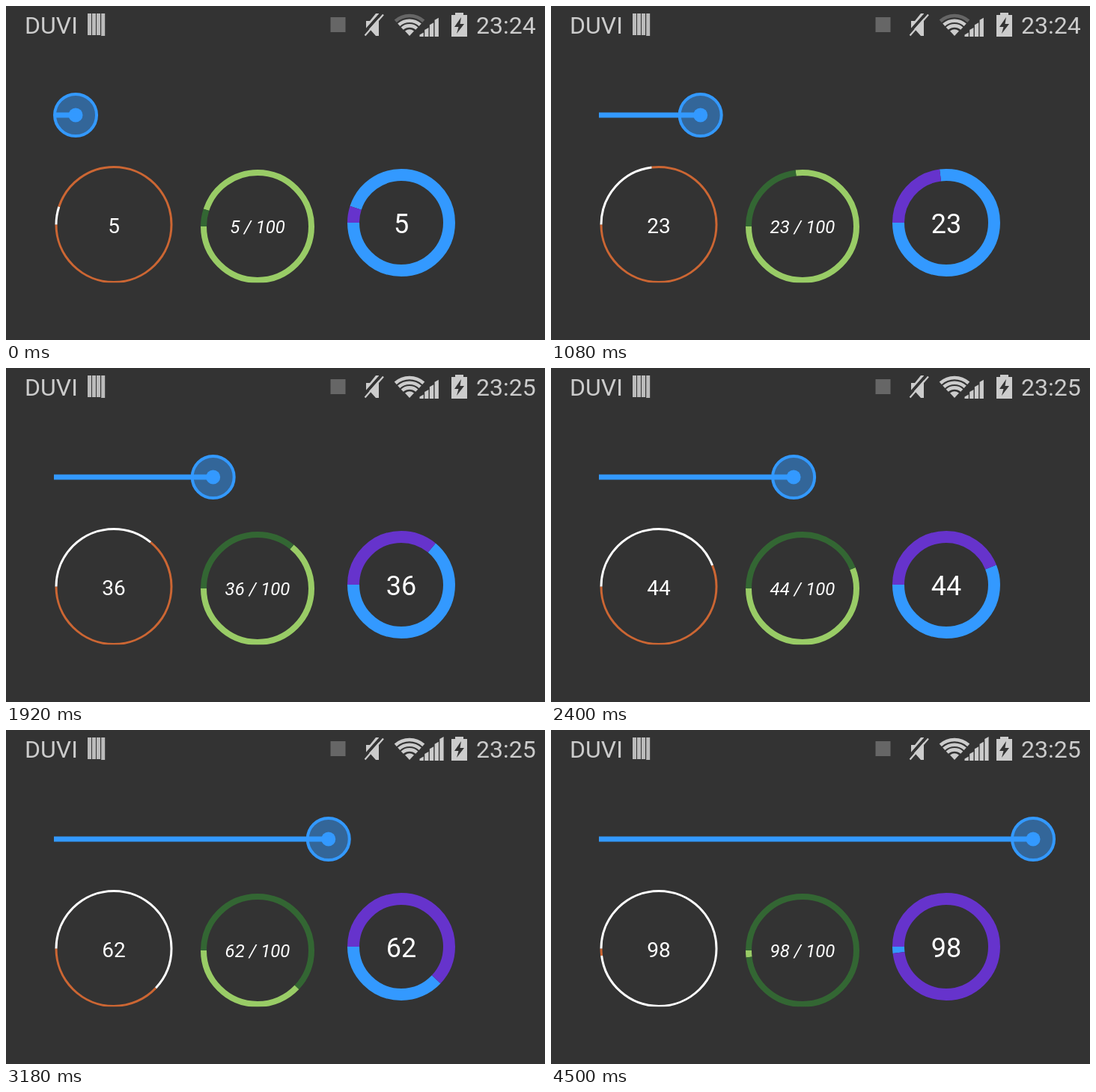
Animation, 720 px wide and 447 px high, one loop 4.62 s. Source, as an HTML page:

```html
<!DOCTYPE html>
<html lang="en">
<head>
<meta charset="utf-8">
<title>Circular progress</title>
<style>
  html, body { margin: 0; width: 100%; height: 100%; overflow: hidden; background: #333; }
  svg { display: block; width: 720px; height: 447px; }
  text { font-family: Roboto, sans-serif; }
  .status text { font-size: 32px; }
  .rings text { fill: #fff; text-anchor: middle; }
</style>
</head>
<body>
<svg viewBox="0 0 720 447">
  <defs>
    <clipPath id="frame"><rect y="200" width="720" height="170.3"/></clipPath>
  </defs>
  <rect width="720" height="447" fill="#333"/>

  <g class="status" fill="#ccc">
    <text x="25" y="37">DUVI</text>
    <path d="M111.5 10V39M117.5 10V39M123.5 10V39M129.7 10V40" stroke="#bbb" stroke-width="5"/>
    <rect x="433.5" y="15" width="20" height="20" fill="#666"/>
    <g id="mute">
      <path d="M481 20H486L494 10H498V40H494L486 31H481Z"/>
      <path d="M477 37L502 9" stroke="#333" stroke-width="4"/>
      <path d="M479.5 39.5L504 11.5" stroke="#ccc" stroke-width="2.2"/>
    </g>
    <g id="wifi" fill="none" stroke="#ccc" stroke-width="4.6"></g>
    <g id="signal"></g>
    <path fill-rule="evenodd" d="M595 12H600V9H611V12H616V41H595ZM608 15L599 28H604.500L602 37L612 24H606.500Z"/>
    <text id="clock" x="628" y="37"></text>
  </g>

  <g id="thumb">
    <circle r="28" cy="146" fill="#369" stroke="#39f" stroke-width="4"/>
    <circle r="9.500" cy="146" fill="#39f"/>
  </g>
  <rect id="track" x="64" y="142.500" height="7" fill="#39f"/>

  <g class="rings" id="rings"></g>
</svg>

<script>
const STEP = 60, LOOP = 4620, LAST = 75;
const CLOCK_STEP = 23, SIGNAL_STEP = 50;

// [step, value] knots of the drag
const DRAG = [[0, 5], [22, 27], [23, 27], [45, 49], [48, 52], [53, 62],
              [54, 63], [65, 85], [69, 93], [72, 96], [75, 98]];

const RINGS = [
  { x: 144, y: 292.5, r: 77, w: 3, base: '#c63', fill: '#fff', size: 28, label: v => v },
  { x: 336, y: 295, r: 72, w: 8, base: '#9c6', fill: '#363', size: 24, italic: true, label: v => v + ' / 100' },
  { x: 528, y: 290, r: 64, w: 16, base: '#39f', fill: '#63c', size: 36, label: v => v }
];

const $ = id => document.getElementById(id);

function add(parent, tag, attrs) {
  const el = document.createElementNS('http://www.w3.org/2000/svg', tag);
  for (const key in attrs) el.setAttribute(key, attrs[key]);
  return parent.appendChild(el);
}

function addArc(ring, stroke) {
  return add($('rings'), 'circle', {
    cx: ring.x, cy: ring.y, r: ring.r, fill: 'none', stroke, 'stroke-width': ring.w,
    pathLength: 100, transform: `rotate(180 ${ring.x} ${ring.y})`
  });
}

for (const ring of RINGS) {
  ring.rest = addArc(ring, ring.base);
  ring.done = addArc(ring, ring.fill);
  ring.text = add($('rings'), 'text', {
    x: ring.x, y: 304, 'font-size': ring.size, 'font-style': ring.italic ? 'italic' : 'normal'
  });
}
$('rings').setAttribute('clip-path', 'url(#frame)');

const waves = [28, 21.3, 14.6].map(r => {
  const dx = r * 0.67, y = 41 - r * 0.742;
  return add($('wifi'), 'path', { d: `M${539 - dx} ${y}A${r} ${r} 0 0 1 ${539 + dx} ${y}` });
});
add($('wifi'), 'path', { d: 'M539 40L533 33.500Q539 29 545 33.500Z', fill: '#ccc', stroke: 'none' });

const bars = [0, 1, 2, 3, 4].map(i => {
  const x = 552.5 + i * 6.7, top = 35.5 - i * 6.6;
  return add($('signal'), 'path', { d: `M${x} 41V${top + 3}L${x + 5.3} ${top}V41Z` });
});

function valueAt(step) {
  const i = Math.max(1, DRAG.findIndex(k => k[0] >= step));
  const [s0, v0] = DRAG[i - 1], [s1, v1] = DRAG[i];
  return Math.round(v0 + (v1 - v0) * (step - s0) / (s1 - s0));
}

function draw(step) {
  const v = valueAt(step), x = 63.4 + 5.925 * v;
  $('thumb').setAttribute('transform', `translate(${x})`);
  $('track').setAttribute('width', x - 64);
  for (const ring of RINGS) {
    ring.done.setAttribute('stroke-dasharray', `${v} 200`);
    ring.rest.setAttribute('stroke-dasharray', `${100 - v} 200`);
    ring.rest.setAttribute('stroke-dashoffset', -v);
    ring.text.textContent = ring.label(v);
  }
  const later = step >= CLOCK_STEP;
  $('clock').textContent = later ? '23:25' : '23:24';
  waves[0].setAttribute('stroke', later ? '#ccc' : '#666');
  bars[4].setAttribute('visibility', step >= SIGNAL_STEP ? 'visible' : 'hidden');
}

const start = performance.now();
function tick(now) {
  const t = Math.max(0, now - start) % LOOP;
  draw(Math.min(LAST, Math.floor(t / STEP)));
  requestAnimationFrame(tick);
}
draw(0);
requestAnimationFrame(tick);
</script>
</body>
</html>
```
